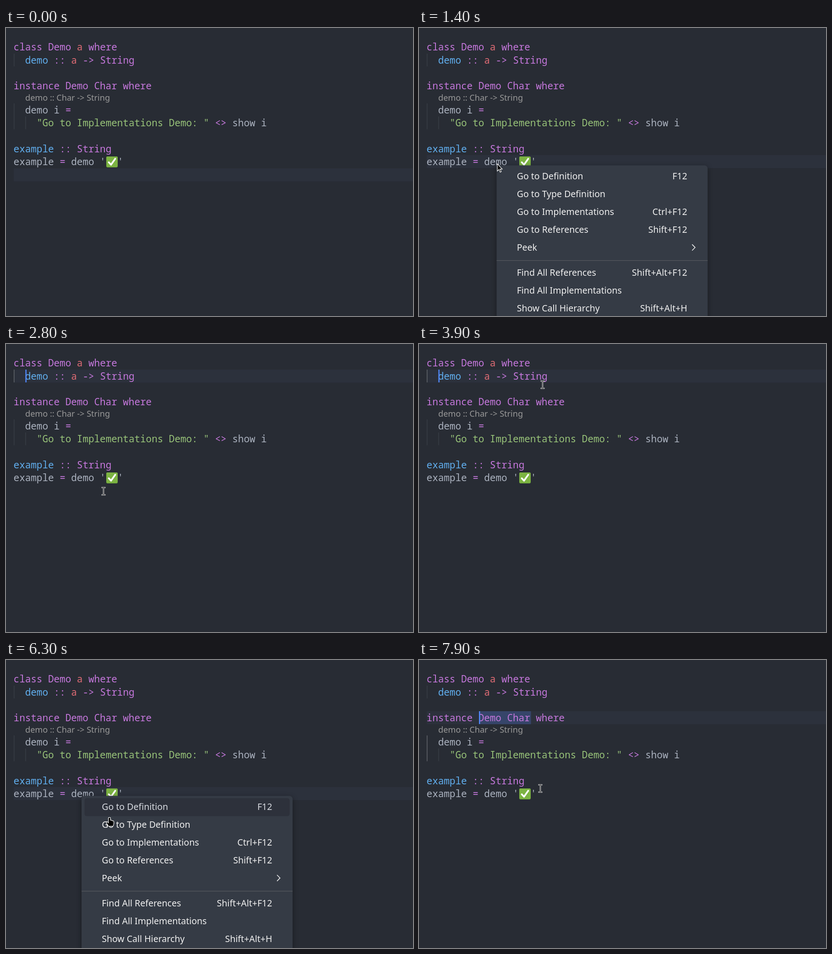
Animation of 889 by 630 pixels, one loop 8000 ms. Source, as an HTML page with a canvas:

```html
<!DOCTYPE html>
<html lang="en">
<head>
<meta charset="utf-8">
<title>Editor navigation</title>
<style>
  html, body { margin: 0; width: 100%; height: 100%; overflow: hidden; background: #282c34; }
  canvas { display: block; }
</style>
</head>
<body>
<canvas id="stage" width="889" height="630"></canvas>
<script>
const ctx = document.getElementById('stage').getContext('2d');
const LOOP = 8000, STEP = 100;
const CODE = '20.95px "Noto Sans Mono", monospace';
const LENS = '18.1px "Noto Sans", sans-serif';
const MENU = '19.5px "Noto Sans", sans-serif';
const LEFT = 16.6, CELL = 12.57, LINE = 28.4;
const COLORS = { p: '#c678dd', r: '#e06c75', b: '#61afef', g: '#98c379', w: '#abb2bf' };

// Each line: top edge, then column, colour and text of its tokens.
const LINES = [
  [27.4, [0, 'p', 'class Demo'], [11, 'r', 'a'], [13, 'p', 'where']],
  [55.8, [2, 'b', 'demo'], [7, 'p', '::'], [10, 'r', 'a'], [12, 'p', '-> String']],
  [112.4, [0, 'p', 'instance Demo Char where']],
  [165.2, [2, 'w', 'demo i'], [9, 'p', '=']],
  [193.5, [4, 'g', '"Go to Implementations Demo: "'], [35, 'p', '<>'], [38, 'w', 'show i']],
  [250.2, [0, 'b', 'example'], [8, 'p', ':: String']],
  [278.4, [0, 'w', 'example'], [8, 'p', '='], [10, 'w', "demo '"], [18.08, 'w', "'"]]
];

const ITEMS = [
  ['Go to Definition', 'F12'],
  ['Go to Type Definition', ''],
  ['Go to Implementations', 'Ctrl+F12'],
  ['Go to References', 'Shift+F12'],
  ['Peek', ''],
  ['Find All References', 'Shift+Alt+F12'],
  ['Find All Implementations', ''],
  ['Show Call Hierarchy', 'Shift+Alt+H']
];

// Editor states: start time, current line top, open menu, caret, hover times per row.
const SCENES = [
  { at: 0, top: 306.9,
    path: [[300, 2, 46], [600, 42, 260], [850, 110, 372], [1100, 168, 307], [1200, 171, 299]] },
  { at: 1400, top: 278.4, menu: [169.5, 300.4], hover: [2000],
    path: [[1800, 171, 297], [2050, 190, 307], [2300, 213, 322]] },
  { at: 2800, top: 55.8, caret: 42.4, guide: 1, arrowAt: 5400,
    path: [[2900, 213, 322], [3150, 330, 348], [3400, 485, 235], [3650, 400, 62], [3900, 270, 89],
      [4130, 260, 260], [4300, 340, 328], [4500, 424, 180], [4700, 330, 32], [5000, 205, 150], [5400, 165, 293]] },
  { at: 5600, top: 278.4, menu: [165, 297.2], hover: [6000, 6400, 6600],
    path: [[5800, 165, 293], [6300, 226, 344], [6700, 285, 403], [6800, 280, 402]] },
  { at: 7600, top: 112.4, caret: 131, guide: 2, marked: true,
    path: [[7500, 280, 402], [7900, 265, 281]] }
];

const ARROW = new Path2D('M0 0V16L3.7 12.6L6.3 18.4L8.7 17.3L6.2 11.6H10.8Z');
const HAND = new Path2D('M-2.3 2Q-2.3 .4 0 .4Q2.3 .4 2.3 2V6.5Q5 5.8 6 7.6Q9.6 7.2 9.6 10V14Q9.2 17 7.8 19.5' +
  'H-2.5Q-4 16 -6.6 12.6Q-7.4 9.4 -4.2 10.2L-2.3 12Z');
const BEAM = new Path2D('M-3 -8H-1Q0 -8 0 -7Q0 -8 1 -8H3M0 -7V7M-3 8H-1Q0 8 0 7Q0 8 1 8H3');

function fill(color, x, y, w, h) {
  ctx.fillStyle = color;
  ctx.fillRect(x, y, w, h);
}

function round(color, x, y, w, h, r) {
  ctx.fillStyle = color;
  ctx.beginPath();
  ctx.roundRect(x, y, w, h, r);
  ctx.fill();
}

function line(color, width, ...pts) {
  ctx.strokeStyle = color;
  ctx.lineWidth = width;
  ctx.beginPath();
  pts.forEach(p => ctx.lineTo(...p));
  ctx.stroke();
}

function text(str, x, y, color, align = 'left') {
  ctx.fillStyle = color;
  ctx.textAlign = align;
  ctx.fillText(str, x, y);
}

// Smooth position on a timed path, at rest before and after it.
function locate(path, t) {
  const last = path.length - 1;
  if (t <= path[0][0]) return path[0].slice(1);
  if (t >= path[last][0]) return path[last].slice(1);
  const i = path.findIndex(p => p[0] > t) - 1;
  const a = path[i], b = path[i + 1], span = b[0] - a[0], u = (t - a[0]) / span;
  const slope = (k, c) => k === 0 || k === last ? 0 :
    (path[k + 1][c] - path[k - 1][c]) / (path[k + 1][0] - path[k - 1][0]);
  return [1, 2].map(c =>
    a[c] + (b[c] - a[c]) * u * u * (3 - 2 * u) +
    span * u * (1 - u) * (slope(i, c) * (1 - u) - slope(i + 1, c) * u));
}

function drawCheck(x, y) {
  round('#689f38', x, y, 25, 24, 3);
  round('#7cb342', x, y, 25, 23, 3);
  ctx.lineCap = ctx.lineJoin = 'round';
  line('#fff', 3.8, [x + 5.5, y + 12.8], [x + 10.4, y + 18], [x + 19.6, y + 5]);
  ctx.lineCap = 'butt';
  ctx.lineJoin = 'miter';
}

function drawCode(scene, t) {
  fill('#282c34', 0, 0, 889, 630);
  fill('#2c313c', 17, Math.round(scene.top), 872, LINE);
  if (scene.marked) fill('#36456a', 131, 112, 113.5, 28.4);

  const guide = n => scene.guide === n ? '#6a6d73' : '#3b4048';
  fill(guide(1), 17, 56, 1.3, 28);
  fill(guide(2), 17, 165, 1.3, 56.5);
  fill('#3b4048', 42.3, 193.5, 1.3, 28);

  ctx.font = CODE;
  for (const [top, ...tokens] of LINES)
    for (const [col, color, str] of tokens)
      text(str, LEFT + col * CELL, top + 21.7, COLORS[color]);
  drawCheck(219, 281);

  ctx.font = LENS;
  text('demo :: Char -> String', 42, 159, '#999999');

  const lit = Math.floor((t - scene.at) / 500) % 2 === 0;
  if (scene.caret && lit) fill('#528bff', scene.caret, Math.round(scene.top), 2.4, 28);
}

function drawMenu(x, y, row) {
  ctx.save();
  ctx.shadowColor = 'rgba(0,0,0,.4)';
  ctx.shadowBlur = 12;
  ctx.shadowOffsetY = 3;
  round('#353b45', x, y, 461, 400, 7);
  ctx.restore();
  if (row >= 0) round('#2d313b', x + 6.5, y + 5 + row * 38.9, 448, 39.4, 5);

  ctx.font = MENU;
  ITEMS.forEach(([label, keys], i) => {
    const base = y + 31 + i * 38.9 + (i > 4 ? 16 : 0);
    const color = i === row ? '#d7dae0' : '#f0f0f0';
    text(label, x + 44.2, base, color);
    text(keys, x + 416.4, base, color, 'right');
  });
  fill('#575a5f', x, Math.round(y + 207.6), 461, 1.2);
  line('#f0f0f0', 1.5, [x + 427, y + 173], [x + 433.6, y + 179.7], [x + 427, y + 186.4]);
}

function drawPointer(kind, x, y) {
  ctx.save();
  ctx.translate(x, y);
  if (kind === 'beam') {
    ctx.lineCap = 'square';
    ctx.strokeStyle = '#fff';
    ctx.lineWidth = 2.6;
    ctx.stroke(BEAM);
    ctx.strokeStyle = '#000';
    ctx.lineWidth = 1;
    ctx.stroke(BEAM);
  } else {
    const shape = kind === 'hand' ? HAND : ARROW;
    ctx.fillStyle = '#000';
    ctx.fill(shape);
    ctx.strokeStyle = '#fff';
    ctx.lineWidth = 1.2;
    ctx.stroke(shape);
  }
  ctx.restore();
}

function draw(t) {
  const scene = SCENES.findLast(s => t >= s.at);
  const row = scene.menu ? scene.hover.filter(h => t >= h).length - 1 : -1;
  drawCode(scene, t);
  if (scene.menu) drawMenu(...scene.menu, row);
  if (t < 300) return;
  const arrow = scene.menu || t >= scene.arrowAt;
  drawPointer(row >= 0 ? 'hand' : arrow ? 'arrow' : 'beam', ...locate(scene.path, t));
}

const start = performance.now();
function tick() {
  const t = (performance.now() - start) % LOOP;
  draw(Math.floor(t / STEP) * STEP);
  requestAnimationFrame(tick);
}
tick();
</script>
</body>
</html>
```
